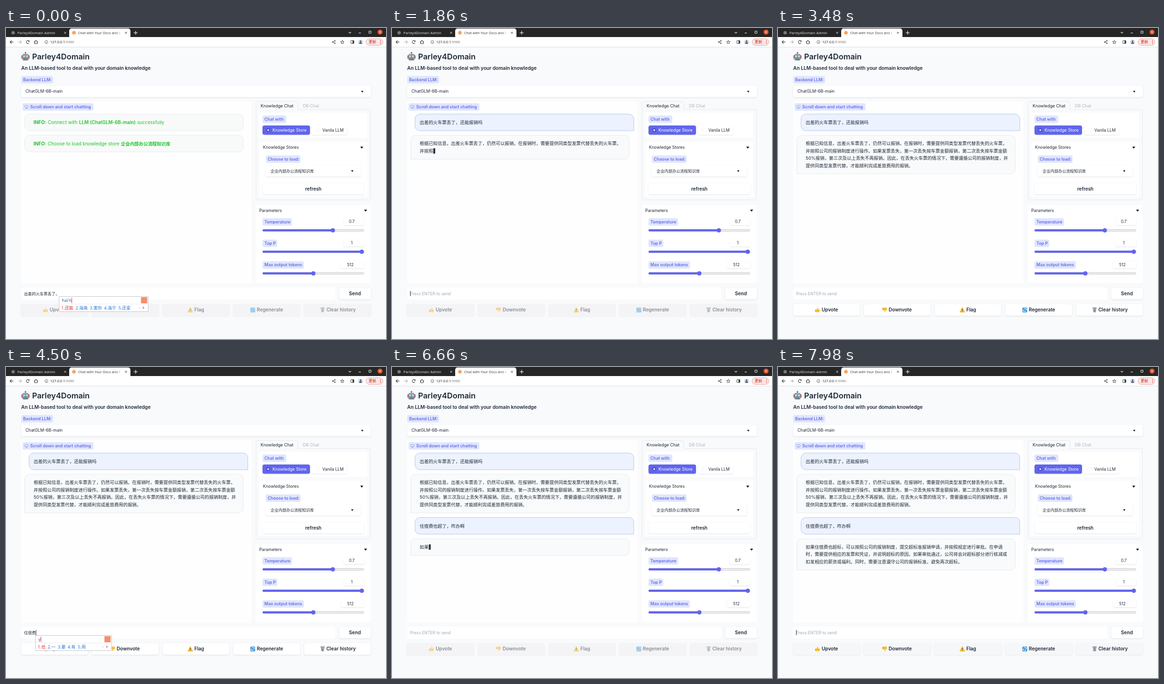
Write an HTML page with a canvas that moves like this. It is 800x654 px and loops after 8000 ms.

```html
<!DOCTYPE html>
<html lang="zh-CN">
<head>
<meta charset="utf-8">
<title>Chat with Your Docs</title>
<style>
html, body { margin: 0; width: 100%; height: 100%; overflow: hidden; background: #f8fafc; }
canvas { display: block; width: 800px; height: 654px; }
</style>
</head>
<body>
<canvas id="stage"></canvas>
<script>
const W = 800, H = 654, LOOP = 8000;
const canvas = document.getElementById('stage');
const dpr = window.devicePixelRatio || 1;
canvas.width = W * dpr;
canvas.height = H * dpr;
const c = canvas.getContext('2d');

const UI = 'Inter, "Noto Sans CJK SC", "Noto Sans CJK", sans-serif';
const SYS = '"Noto Sans", "Noto Sans CJK SC", "Noto Sans CJK", sans-serif';
const INK = '#1f2937', LINE = '#e8eaee', BLUE = '#6165ec', GREEN = '#1ec42c';
const APP = 'Parley4Domain', STORE = '企业内部办公流程知识库';

const ASK1 = '出差的火车票丢了，还能报销吗';
const ASK2 = '住宿费也超了，咋办啊';
const REPLY1 = [
  '根据已知信息，出差火车票丢了，仍然可以报销。在报销时，需要提供同类型发票代替丢失的火车票，',
  '并按照公司的报销制度进行操作。如果发票丢失，第一次丢失按车票金额报销，第二次丢失按车票金额',
  '50%报销，第三次及以上丢失不再报销。因此，在丢失火车票的情况下，需要遵循公司的报销制度，并',
  '提供同类型发票代替，才能顺利完成差旅费用的报销。'
];
const REPLY2 = [
  '如果住宿费也超标，可以按照公司的报销制度，提交超标准报销申请，并按照规定进行审批。在申请',
  '时，需要提供相应的发票和凭证，并说明超标的原因。如果审批通过，公司将会对超标部分进行核减或',
  '扣发相应的薪资或福利。同时，需要注意遵守公司的报销标准，避免再次超标。'
];

// [time, characters standing in the input]
const COMMITS = [[-700, 9], [240, 11], [690, 13], [930, 14], [1080, 0],
  [4420, 3], [5390, 6], [5600, 7], [6240, 10], [6400, 0]];

// pinyin typed one key at a time; few = choices for the first keys
const WORDS = [
  { t: -240, dt: 60, end: 240, py: "hai'neng", few: '和 好 会 还 后', full: '还能 海南 害你 海宁 还拿' },
  { t: 300, dt: 50, end: 690, py: "bao'xiao", few: '不 把 吧 被 比', full: '报销 报效 爆笑 报晓 包销' },
  { t: 700, dt: 90, end: 930, py: 'ma', few: '吗 买 马 明 们', full: '吗 买 马 明 们' },
  { t: 3660, dt: 70, end: 4420, py: "zhu'su'fei", few: '在 这 中 正 只', full: '住宿费 住宿 诸素 住 主' },
  { t: 4500, dt: 75, end: 5390, py: "ye'chao'le", few: '也 一 要 有 用', full: '也超了 也超 夜潮 野草 也' },
  { t: 5720, dt: 60, end: 6240, py: "za'ban'a", few: '在 咋 再 做 怎', full: '咋办啊 咋办 咋 杂 砸' }
];

function box(x, y, w, h, r, fill, stroke, shadow) {
  c.save();
  c.beginPath();
  c.roundRect(x, y, w, h, r);
  if (shadow) {
    c.shadowColor = 'rgba(0,0,0,.1)';
    c.shadowBlur = 2.5 * dpr;
    c.shadowOffsetY = dpr;
  }
  if (fill) { c.fillStyle = fill; c.fill(); }
  c.shadowColor = 'transparent';
  if (stroke) { c.strokeStyle = stroke; c.lineWidth = 1; c.stroke(); }
  c.restore();
}

function text(s, x, y, size, weight = 400, color = INK, align = 'left', face = UI) {
  c.font = `${weight} ${size}px ${face}`;
  c.fillStyle = color;
  c.textAlign = align;
  c.fillText(s, x, y);
  return c.measureText(s).width;
}

function dot(x, y, r, fill, stroke, lw = 1) {
  c.beginPath();
  c.arc(x, y, r, 0, 7);
  if (fill) { c.fillStyle = fill; c.fill(); }
  if (stroke) { c.strokeStyle = stroke; c.lineWidth = lw; c.stroke(); }
}

function poly(pts, fill, stroke, lw = 1.1) {
  c.beginPath();
  for (let i = 0; i < pts.length; i += 2) c.lineTo(pts[i], pts[i + 1]);
  if (fill) { c.closePath(); c.fillStyle = fill; c.fill(); }
  if (stroke) { c.strokeStyle = stroke; c.lineWidth = lw; c.stroke(); }
}

function cross(x, y, r, color) {
  poly([x - r, y - r, x + r, y + r], null, color, 1);
  poly([x - r, y + r, x + r, y - r], null, color, 1);
}

function arrowDown(x, y, r) {
  poly([x - r, y - r * .6, x + r, y - r * .6, x, y + r * .8], '#111');
}

function tag(s, x, y, w, pad = 4) {
  box(x, y, w, 15.5, 3, '#dfe6fe');
  text(s, x + pad, y + 10.8, 8.85, 600, '#666bea');
}

function browser() {
  c.fillStyle = '#262627';
  c.fillRect(0, 0, W, 19);
  dot(15, 10, 3.6, '#77797d');
  text(APP + ' Admin', 24, 13, 7.6, 400, '#d5d6d8', 'left', SYS);
  cross(124.5, 10, 2, '#ddd');
  box(133, 1, 129, 22, 5, '#fff');
  dot(143, 10, 3.8, '#f5a35c');
  text('Chat with Your Docs and I', 152, 13, 7.3, 400, '#3c4043', 'left', SYS);
  const fade = c.createLinearGradient(230, 0, 247, 0);
  fade.addColorStop(0, 'rgba(255,255,255,0)');
  fade.addColorStop(1, '#fff');
  c.fillStyle = fade;
  c.fillRect(230, 3, 19, 14);
  cross(252.5, 10, 2, '#444');
  poly([269, 10, 277, 10], null, '#eee', 1.2);
  poly([273, 6, 273, 14], null, '#eee', 1.2);
  poly([721.5, 8.5, 724, 11, 726.5, 8.5], null, '#ddd');
  poly([742.5, 10.5, 747, 10.5], null, '#eee');
  box(764, 6.5, 4.5, 4.5, 0, null, '#eee');
  dot(787.5, 8.5, 5.2, '#e9562c');
  cross(787.5, 8.5, 1.7, '#fff');

  c.fillStyle = '#fff';
  c.fillRect(0, 19, W, 21);
  c.fillStyle = '#dfe1e5';
  c.fillRect(0, 39.5, W, 1);
  const dark = '#3c4043';
  poly([15.5, 29.5, 8.5, 29.5], null, dark, 1.2);
  poly([11.8, 26.2, 8.5, 29.5, 11.8, 32.8], null, dark, 1.2);
  poly([25.5, 29.5, 32.5, 29.5], null, '#b5b7ba', 1.2);
  poly([29.2, 26.2, 32.5, 29.5, 29.2, 32.8], null, '#b5b7ba', 1.2);
  c.beginPath();
  c.arc(46, 29.5, 3.1, .6, 5.5);
  c.strokeStyle = dark;
  c.lineWidth = 1.2;
  c.stroke();
  poly([49.5, 25.8, 49.5, 29, 46.3, 29], dark);
  poly([59, 30, 63, 26, 67, 30], null, dark, 1.2);
  poly([60.3, 29, 60.3, 33, 65.7, 33, 65.7, 29], null, dark, 1.2);
  dot(85, 29.5, 3.2, null, '#5f6368', .9);
  poly([85, 29, 85, 31.3], null, '#5f6368', .9);
  const w = text('127.0.0.1', 93, 32.3, 7.4, 400, '#202124', 'left', SYS);
  text(':9986', 93 + w, 32.3, 7.4, 400, '#7b7f84', 'left', SYS);

  poly([692.5, 27, 688, 29.5, 692.5, 32], null, dark, .9);
  for (const [x, y] of [[692.5, 27], [688, 29.5], [692.5, 32]]) dot(x, y, 1.2, dark);
  const star = [];
  for (let i = 0; i <= 10; i++) {
    const r = i % 2 ? 1.7 : 3.9, a = i * Math.PI / 5 - Math.PI / 2;
    star.push(708 + r * Math.cos(a), 29.8 + r * Math.sin(a));
  }
  poly(star, null, dark, .9);
  box(726, 26.5, 6.5, 6, .5, null, dark);
  c.fillStyle = dark;
  c.fillRect(729.5, 26.5, 3, 6);
  dot(746.5, 29.5, 5.3, '#d5dbe6');
  dot(746.5, 28, 1.7, '#46536b');
  box(743.6, 30.2, 5.8, 2.8, [2, 2, 0, 0], '#46536b');
  box(758, 22.5, 35.5, 14, 7, '#fce8e6', '#e2a29d');
  text('更新', 763.5, 32.4, 8, 400, '#c5221f', 'left', SYS);
  for (const y of [26.6, 29.5, 32.4]) dot(788.5, y, .8, '#c5221f');
}

function robot() {
  box(32.5, 57, 4, 8, 2, '#d9483b');
  box(45.5, 57, 4, 8, 2, '#d9483b');
  poly([41, 51.5, 41, 56], null, '#607d8b', 1.6);
  dot(41, 52, 1.7, '#e5533d');
  box(34.5, 54.5, 13, 14, 3, '#8ba3ae');
  dot(38, 59.5, 2.1, '#e9fbff', '#41a5b5', 1);
  dot(44, 59.5, 2.1, '#e9fbff', '#41a5b5', 1);
  poly([41, 61, 42.2, 63, 39.8, 63], '#d9483b');
  box(37, 64.2, 8, 2.6, 1, '#37474f');
  for (const x of [39, 41, 43]) poly([x, 64.4, x, 66.6], null, '#dfe7ea', .7);
}

function slider(name, tagW, y, pos, val, valX) {
  tag(name, 540, y - 25.5, tagW);
  box(valX, y - 25.5, 754 - valX, 14.5, 3, '#fff', null, true);
  text(val, (valX + 745) / 2, y - 15.2, 8.4, 400, INK, 'center');
  box(540.5, y - 2, 213, 4, 2, '#ececee', '#cfcfd2');
  box(540, y - 2.3, pos - 540, 4.6, 2.3, BLUE);
  dot(pos, y, 4.6, BLUE);
}

function panels() {
  c.fillStyle = '#f8fafc';
  c.fillRect(0, 40.5, W, H);
  robot();
  text(APP, 55, 66, 16.4, 600);
  text('An LLM-based tool to deal with your domain knowledge', 32, 88, 10.17, 600);
  tag('Backend LLM:', 32, 101, 67);
  box(32, 121.5, 736, 24, 4, '#fff', null, true);
  text('ChatGLM-6B-main', 41, 136.2, 8.8);
  arrowDown(750, 133.7, 2.5);

  box(32, 154, 485, 384, 4, '#fefefe');
  tag('Scroll down and start chatting', 35, 158.3, 149, 16);
  box(39.5, 163, 7, 4.6, 1.5, null, '#9a9ff2');
  poly([41.5, 167.5, 43, 169.5, 44.5, 167.5], null, '#9a9ff2');

  box(526.5, 171.5, 241, 190, [0, 0, 4, 4], '#f9fafc', LINE);
  box(526.5, 154.5, 88, 18, [4, 4, 0, 0], '#f9fafc', LINE);
  c.fillStyle = '#f9fafc';
  c.fillRect(527, 170.5, 87, 4);
  text('Knowledge Chat', 536, 167, 8.9);
  text('DB Chat', 625, 167, 8.9, 400, '#b1b5bd');

  box(533, 178, 228, 53, 4, '#fff');
  tag('Chat with', 540, 184, 50);
  box(540, 205, 100, 19.5, 4, BLUE, null, true);
  dot(552, 214.7, 4, '#5357d8', '#4a4ed0', .8);
  dot(552, 214.7, 1.7, '#fff');
  text('Knowledge Store', 561, 218, 8.9, 400, '#fff');
  box(644, 205, 74, 19.5, 4, '#fff', null, true);
  dot(656, 214.7, 4, '#fff', '#eef0f3', .8);
  text('Vanila LLM', 666, 218, 8.7);

  box(533, 239, 228, 116, 4, '#fff');
  text('Knowledge Stores', 541, 254.3, 8.75);
  arrowDown(749, 251.3, 3.2);
  tag('Choose to load:', 547, 268, 73);
  box(547, 289.5, 200, 23, 4, '#fff', null, true);
  text(STORE, 557, 303.6, 8.27);
  arrowDown(729, 300.7, 2.5);
  box(540, 326.5, 214, 23.5, 4, '#fff', null, true);
  text('refresh', 647, 341.5, 9.8, 600, INK, 'center');

  box(526, 372.5, 242, 163.5, 4, '#fff');
  text('Parameters', 533, 387, 8.9);
  arrowDown(757, 383.8, 3.2);
  slider('Temperature', 62, 425.5, 688, '0.7', 711);
  slider('Top P', 31, 470.5, 749, '1', 711);
  slider('Max output tokens', 87, 516, 647, '512', 705);

  box(32, 546, 661, 25, 4, '#fff');
  box(701.5, 546.5, 66.5, 24, 4, '#fff', null, true);
  text('Send', 734.5, 562, 10.1, 600, INK, 'center');
}

function info(y, parts) {
  box(39.5, y, 460, 35, 10, '#f8faf9', LINE);
  for (const [s, x, weight, size] of parts) text(s, x, y + 21, size || 9.8, weight, GREEN);
}

function ask(s, y) {
  box(48.5, y, 460.5, 35, [10, 10, 0, 10], '#ecf2fe', '#b9c6f3');
  text(s, 58.3, y + 21.2, 9.45);
}

function reply(lines, y, p) {
  const total = lines.join('').length;
  let left = Math.floor(Math.min(1, p) * total), n = 0;
  const shown = [];
  do {
    shown.push(lines[n].slice(0, left));
    left -= lines[n].length;
    n++;
  } while (left > 0 && n < lines.length);
  box(39.5, y, 460, 19.8 + 15.4 * n, [10, 10, 10, 0], '#f8fafb', LINE);
  shown.forEach((s, i) => {
    const base = y + 20.8 + i * 15.45;
    const w = text(s, 58.3, base, 9.44);
    if (i === n - 1 && p < 1) {
      c.fillStyle = INK;
      c.fillRect(58.8 + w, base - 8.8, 3.8, 11.2);
    }
  });
}

function chat(t) {
  if (t < 1080) {
    info(181, [['INFO:', 58, 700], ['Connect with', 88, 400, 10], ['LLM (ChatGLM-6B-main)', 154, 600], ['successfully', 276.5, 400, 9.6]]);
    info(225.5, [['INFO:', 58, 700], ['Choose to load knowledge store', 88, 400, 9.9], [STORE, 242, 700, 9.45]]);
    return;
  }
  ask(ASK1, 181);
  if (t >= 1140) reply(REPLY1, 225.5, Math.max(0, (t - 1240) / 2050));
  if (t >= 6420) ask(ASK2, 316.5);
  if (t >= 6520) reply(REPLY2, 361, Math.max(0, (t - 6635) / 1270));
}

function thumb(x, y, flip) {
  c.save();
  c.translate(x, y);
  if (flip) c.scale(1, -1);
  poly([-3, -.5, -.8, -2, .2, -5, 1.8, -4.6, 1.6, -1.2, 4.6, -1, 4.4, 3.8, 2.6, 4.7, -1.5, 4.4, -3, 3.6], '#fcc02c');
  box(-4.8, -.8, 2.4, 5, .6, '#f0a41d');
  for (const k of [.6, 2.4]) poly([1.8, k, 4.5, k], null, '#e39a17', .6);
  c.restore();
}

const ICONS = [
  () => thumb(83, 593),
  () => thumb(224.5, 592.5, true),
  () => {
    poly([388, 587.8, 393.2, 597.6, 382.8, 597.6], '#fbc02d', '#eeb022', 1);
    poly([388, 590.8, 388, 594.4], null, '#3b3b3b', 1.2);
    dot(388, 596.1, .7, '#3b3b3b');
  },
  () => {
    box(514.5, 588, 10, 10, 1.5, '#2f8fd8');
    for (const a of [.4, 3.54]) {
      c.beginPath();
      c.arc(519.5, 593, 2.8, a, a + 2.3);
      c.strokeStyle = '#fff';
      c.lineWidth = 1.2;
      c.stroke();
    }
    poly([521, 590, 524, 590, 523, 593], '#fff');
    poly([518, 596, 515, 596, 516, 593], '#fff');
  },
  () => {
    poly([662.8, 589.5, 670.2, 589.5, 669.2, 598, 663.8, 598], '#a9b3b9');
    for (const x of [665, 666.5, 668]) poly([x, 591, x, 597], null, '#6e7980', .7);
    box(662, 587.8, 9, 1.8, .9, '#76828a');
  }
];
const LABELS = [['Upvote', 92], ['Downvote', 233], ['Flag', 396.5], ['Regenerate', 528], ['Clear history', 674.5]];

function buttons(t) {
  const off = t < 3300 || (t >= 6460 && t < 7950);
  const since = t - (t < 6460 ? 3300 : 7950);
  const grey = off ? 1 : Math.max(0, 1 - since / 130);
  LABELS.forEach(([s, x], i) => {
    const g = grey * .5, bx = 32 + 149 * i;
    box(bx, 581, 140, 24, 4, '#fff', null, true);
    if (grey) {
      c.globalAlpha = grey;
      box(bx - g, 581 - g, 140 + 2 * g, 24.5 + 2 * g, 4, off ? '#f4f4f6' : '#f3f5f7');
    }
    c.globalAlpha = off ? .5 : 1;
    ICONS[i]();
    text(s, x, 596.4, 10, 600);
    c.globalAlpha = 1;
  });
}

function popup(x, keys, list) {
  const chars = list.join('').length;
  const w = Math.max(160, 37 + list.length * 12.1 + chars * 9);
  box(x, 564.5, w, 32, 0, '#fff', '#c3c5c9');
  poly([x + 4, 580.5, x + w - 18, 580.5], null, '#e8eaec', 1);
  const kw = text(keys, x + 6, 576, 8.9, 400, '#2c57a8', 'left', SYS);
  poly([x + 6.8 + kw, 567, x + 6.8 + kw, 578.5], null, '#e03a3a', 1);
  box(x + w - 15, 566, 13, 13, 0, '#f3906c');
  let at = x + 4.5;
  list.forEach((s, i) => {
    text(`${i + 1}.${s}`, at, 592, 9, 400, i ? '#2b74d6' : '#e02b2b', 'left', SYS);
    at += 12.1 + s.length * 9;
  });
  const r = x + w;
  poly([r - 17.5, 586, r - 19.5, 588.3, r - 17.5, 590.6], null, '#c4c4c4', .9);
  poly([r - 11, 586, r - 9, 588.3, r - 11, 590.6], null, '#e03a3a', 1.1);
}

function input(t) {
  const [since, count] = COMMITS.filter(m => m[0] <= t).pop();
  const s = (t < 1080 ? ASK1 : ASK2).slice(0, count);
  let x = 38;
  if (s) x += text(s, 38, 561.6, 8.25);
  else text('Press ENTER to send', 38, 561.6, 8.6, 400, '#a3a8b2');
  const blink0 = s ? since : t < 4420 ? 780 : 5740;
  if ((t - blink0) % 1080 < 540) {
    c.fillStyle = INK;
    c.fillRect(x, 553, .9, 11);
  }
  const word = WORDS.find(w => t >= w.t && t < w.end);
  if (word) {
    const n = Math.floor((t - word.t) / word.dt) + 1;
    popup(x - .5, word.py.slice(0, n), (n < 3 ? word.few : word.full).split(' '));
  }
}

function draw(now) {
  const t = now % LOOP;
  c.setTransform(dpr, 0, 0, dpr, 0, 0);
  panels();
  browser();
  chat(t);
  buttons(t);
  input(t);
}

let start;
function tick(now) {
  if (start === undefined) start = now;
  draw(now - start);
  requestAnimationFrame(tick);
}
draw(0);
requestAnimationFrame(tick);
</script>
</body>
</html>
```
